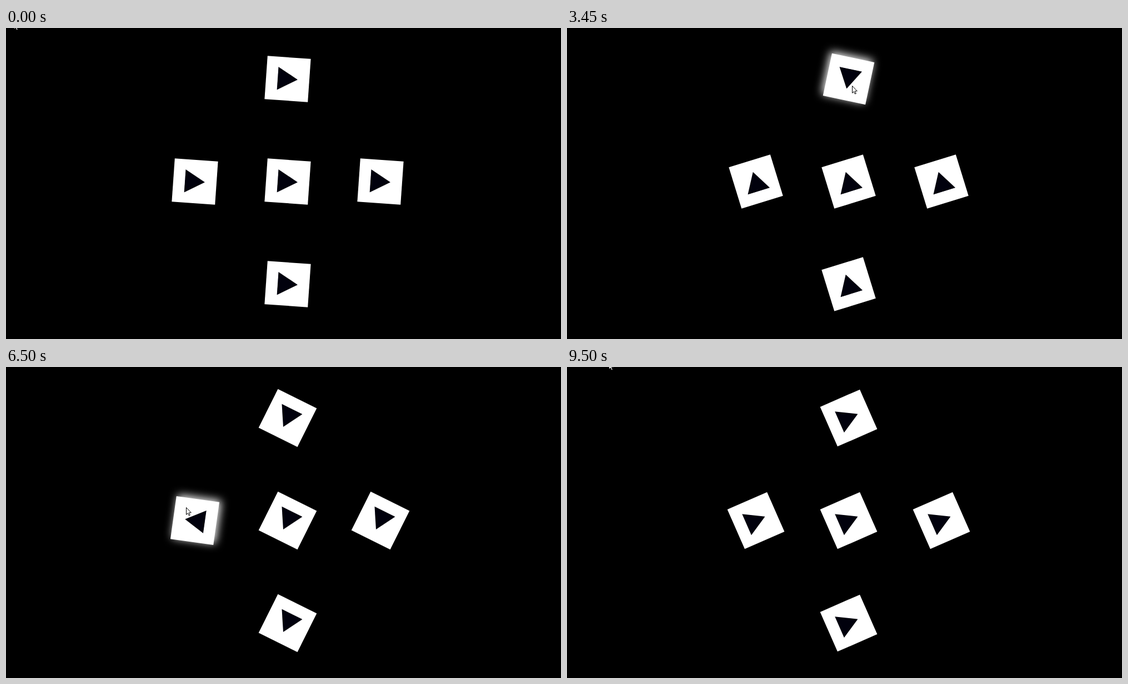
Recreate the animation shown at these times as an HTML page. Size 999x561 px, loop 9.55 s.

```html
<!DOCTYPE html>
<html lang="en">
<head>
<meta charset="utf-8">
<title>Spinning play tiles</title>
<style>
  html, body { margin: 0; width: 100%; height: 100%; overflow: hidden; background: #000; }
  .tile { position: absolute; width: 78px; height: 78px; margin: -39px; background: #fff; }
  .tile::before {
    content: ""; position: absolute; left: 20.5px; top: 18px; width: 36.5px; height: 42px;
    background: #01010d; clip-path: polygon(0 0, 100% 50%, 0 100%);
  }
  .hover { box-shadow: -3px 3px 16px #fff; }
  #cursor { position: absolute; left: 0; top: 0; overflow: visible; }
</style>
</head>
<body>
<svg id="cursor" width="11" height="17">
  <path d="M.5 .5V13.3L3.4 10.6L5.3 15L7.3 14.2L5.4 9.8H9.3Z" fill="#fff" stroke="#000"/>
</svg>
<script>
const LOOP = 9550, STEP = 50;
const STALL = { from: 1550, to: 1700 };
const cursor = document.getElementById('cursor');

function addTile(column, row, hover) {
  const el = document.createElement('div');
  el.className = 'tile';
  el.style.left = 507 + column * 167.2 + 'px';
  el.style.top = 276.9 + row * 185 + 'px';
  document.body.insertBefore(el, cursor);
  return { el, hover };
}

// A cross of tiles; two of them are hovered for a while
const tiles = [
  addTile(0, -1, { from: 2550, to: 4350, phase: 138 }),
  addTile(-1, 0, { from: 5200, to: 8050, phase: 188 }),
  addTile(0, 0),
  addTile(1, 0),
  addTile(0, 1),
];

// The pointer rests between these moves
const home = { x: 14, y: -11 };
const moves = [
  { from: 0, to: 1050, x: 27, y: -11 },
  { from: 1050, to: 1550, x: 247, y: 77 },
  { from: 1700, to: 2750, x: 513, y: 104 },
  { from: 4150, to: 4800, x: 330, y: 106 },
  { from: 4900, to: 5300, x: 324, y: 253 },
  { from: 7900, to: 8550, x: 75, y: -9 },
];

const clamp = p => Math.min(1, Math.max(0, p));
const smooth = p => p * p * (3 - 2 * p);

function pointerAt(t) {
  let { x, y } = home;
  for (const move of moves) {
    const p = smooth(clamp((t - move.from) / (move.to - move.from)));
    x += (move.x - x) * p;
    y += (move.y - y) * p;
  }
  return { x, y };
}

// One turn takes about 5 s; a short stall follows a slightly faster start
const idleAngle = t => t < STALL.to ? 4 + 0.0767 * Math.min(t, STALL.from) : 0.0733 * t;

// A hovered tile turns twice a second
const hoverAngle = (t, phase) => 0.72 * t + phase;

function draw(now) {
  const t = Math.floor(now % LOOP / STEP) * STEP;
  for (const { el, hover } of tiles) {
    const hovered = !!hover && t >= hover.from && t < hover.to;
    const angle = hovered ? hoverAngle(t, hover.phase) : idleAngle(t);
    el.classList.toggle('hover', hovered);
    el.style.transform = `rotate(${angle}deg)`;
  }
  const { x, y } = pointerAt(t);
  cursor.style.transform = `translate(${x}px, ${y}px)`;
}

let start;
function frame(now) {
  start ??= now;
  draw(now - start);
  requestAnimationFrame(frame);
}
draw(0);
requestAnimationFrame(frame);
</script>
</body>
</html>
```
